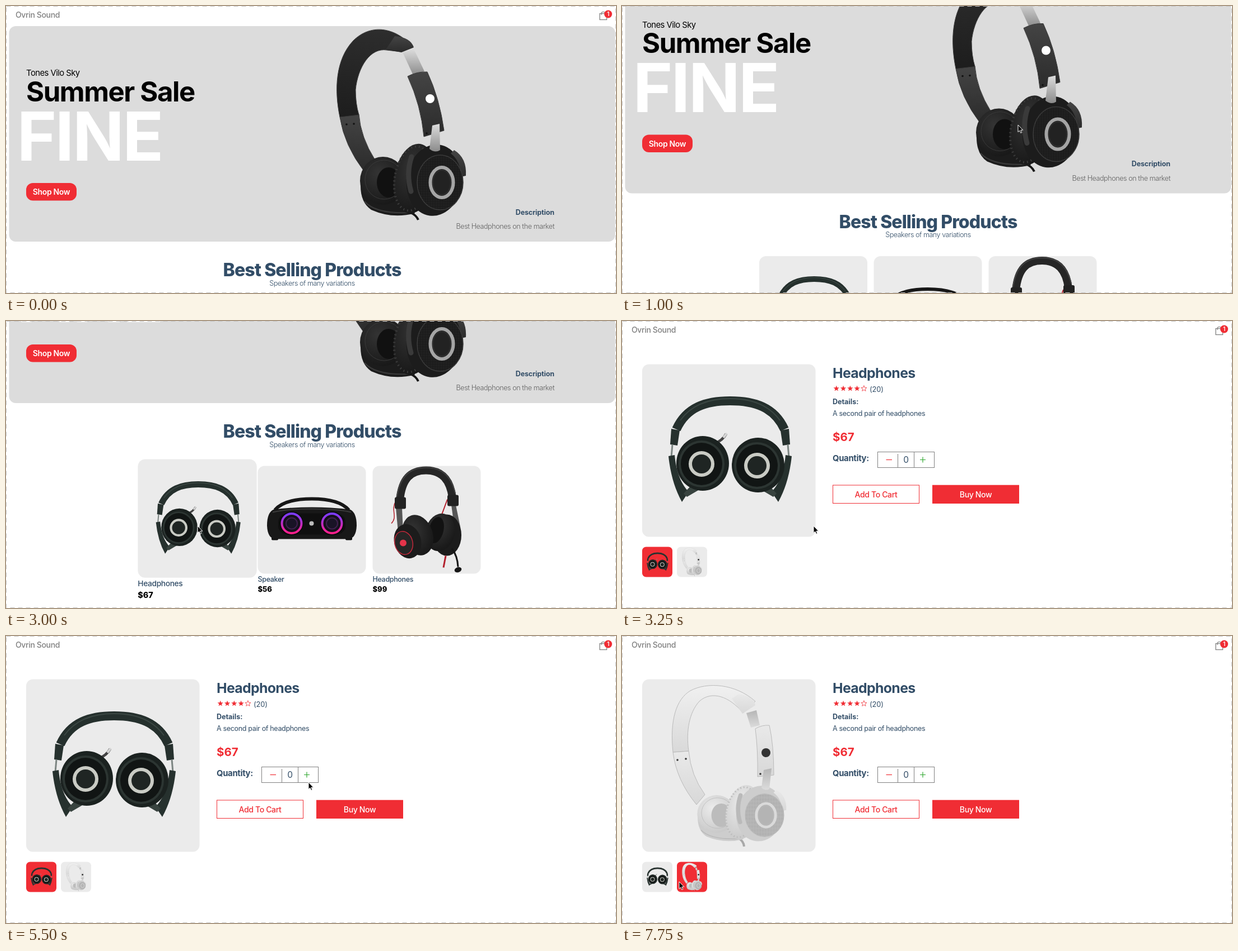
Write an HTML page that moves like this. It is 1089x514 px and loops after 8 s.

```html
<!DOCTYPE html>
<html lang="en">
<head>
<meta charset="utf-8">
<title>Sound shop</title>
<style>
  html, body { margin: 0; width: 100%; height: 100%; overflow: hidden; background: #fff; }
  svg { display: block; width: 1089px; height: 514px; font-family: Inter, Roboto, sans-serif; }
</style>
</head>
<body>
<svg id="stage" viewBox="0 0 1089 514"></svg>
<script>
const LOOP = 8000, STEP = 250;
const RED = '#f02d34', NAVY = '#324d67', GRAY = '#808080', CARD = '#ebebeb';

const text = (x, y, str, size, weight, fill, anchor = 'start', spacing = -0.026) =>
  `<text x="${x}" y="${y}" font-size="${size}" font-weight="${weight}" fill="${fill}" text-anchor="${anchor}" letter-spacing="${(spacing * size).toFixed(2)}">${str}</text>`;
const rect = (x, y, w, h, fill, r = 0, more = '') =>
  `<rect x="${x}" y="${y}" width="${w}" height="${h}" rx="${r}" fill="${fill}" ${more}/>`;
const oval = (x, y, rx, ry, fill, more = '', turn = 0) =>
  `<ellipse cx="${x}" cy="${y}" rx="${rx}" ry="${ry}" fill="${fill}" transform="rotate(${turn} ${x} ${y})" ${more}/>`;
const shape = (d, fill, more = '') => `<path d="${d}" fill="${fill}" ${more}/>`;
const line = (d, color, width, more = '') =>
  `<path d="${d}" fill="none" stroke="${color}" stroke-width="${width}" ${more}/>`;
const stroke = (color, width) => `stroke="${color}" stroke-width="${width}"`;
const group = (id, body, more = '') => `<g id="${id}" ${more}>${body}</g>`;
const use = (id, transform) => `<use href="#${id}" transform="${transform}"/>`;
const gradient = (id, top, bottom) =>
  `<linearGradient id="${id}" x2="0" y2="1"><stop stop-color="${top}"/><stop offset="1" stop-color="${bottom}"/></linearGradient>`;
const glow = (id, center, rim) =>
  `<radialGradient id="${id}" cx=".4" cy=".35" r=".65"><stop stop-color="${center}"/><stop offset="1" stop-color="${rim}"/></radialGradient>`;
const mesh = (id, base, dot) =>
  `<pattern id="${id}" width="3" height="3" patternUnits="userSpaceOnUse">${rect(0, 0, 3, 3, base)}${rect(0, 0, 1.4, 1.4, dot)}</pattern>`;

// Ear cups shared by the black and the white over-ear model
const cups = c => `
  ${shape('M633 322Q633 352 652 365Q690 382 730 371L700 290Z', c.body)}
  ${line('M640 350Q660 373 722 370', c.edge, 2)}
  ${oval(673, 313, 41, 43, c.pad)}${oval(675, 311, 34, 35, 'none', stroke(c.edge, 1))}
  ${oval(683, 316, 21, 27, c.hole)}
  ${oval(729, 309, 36, 63, c.pad, '', 10)}
  ${oval(726, 309, 32, 58, 'none', stroke(c.edge, 4) + ' stroke-dasharray="2 5"', 10)}
  ${oval(765, 312, 50, 64, c.body, '', 8)}
  ${line('M724 270Q714 300 723 332', c.edge, 9, 'stroke-linecap="round"')}
  ${shape('M800 258Q823 272 821 304L812 306Q812 278 794 264Z', c.arm)}
  ${oval(775, 316, 41, 49, c.mesh, stroke(c.edge, 1.5))}
  ${oval(778, 316, 20.5, 27, c.center, stroke(c.ring, 6))}
  ${oval(778, 316, 16, 22, 'none', stroke(c.edge, 1))}`;

const overEar = (id, c, p) => group(id, `
  ${line(p.cable, c.cable, 4)}
  ${shape(p.leftArm, c.arm, stroke(c.edge, 1))}
  ${shape(p.band, c.band, stroke(c.edge, 1))}${shape(p.cap, c.arm)}
  ${shape(p.slider, c.metal)}
  ${shape(p.arm, c.arm, stroke(c.edge, 1))}
  <circle cx="${p.logo[0]}" cy="${p.logo[1]}" r="8" fill="${c.logo}"/>
  ${p.screws.map(([x, y]) => oval(x, y, 1.8, 1.8, c.screw)).join('')}
  <g transform="${p.cups}">${cups(c)}</g>
  ${shape(p.joint, c.metal)}`);

const black = { body: '#1c1c1c', pad: 'url(#blackPad)', edge: '#3a3a3a', hole: '#111', arm: 'url(#blackArm)', band: 'url(#blackBand)',
  mesh: 'url(#darkMesh)', center: '#222', ring: '#a5a5a5', metal: 'url(#steel)', logo: '#fff', screw: '#111', cable: '#161616' };
const white = { body: '#cdcdcd', pad: 'url(#whitePad)', edge: '#bababa', hole: '#bcbcbc', arm: 'url(#whiteArm)', band: 'url(#whiteBand)',
  mesh: 'url(#lightMesh)', center: '#b4b4b4', ring: '#dadada', metal: 'url(#paleSteel)', logo: '#333', screw: '#333', cable: '#a8a8a8' };

const foldSide = `
  ${shape('M88 193L103 196 99 223 86 221Z', '#26312e')}
  ${line('M90 221L88 244', '#7c8582', 3)}
  ${shape('M83 242L94 240Q98 284 119 306L107 324Q88 290 83 242Z', '#26312e')}
  ${shape('M110 309L122 296 138 302 116 315Z', '#38433f')}`;
const foldCup = (x, y) => `
  ${oval(x + 2, y - 1, 47, 49, '#1b2220')}${oval(x, y, 41, 42, '#2c3532')}
  ${oval(x, y, 37, 38, '#111514')}
  ${oval(x, y, 20, 20, '#1f2523', stroke('#c9cbc4', 6))}`;
const folding = group('folding', `
  ${line('M97 194C115 154 150 143 193 143C236 143 272 154 290 194', '#25302d', 16)}
  ${line('M104 178C124 150 155 139 193 139C232 139 262 150 282 178', '#3b4743', 2)}
  ${foldSide}<g transform="matrix(-1 0 0 1 386 0)">${foldSide}</g>
  ${line('M163 221Q180 214 186 202', '#444', 5)}${line('M181 209L187 201', '#d5d5d5', 4)}
  ${foldCup(142, 256)}${foldCup(241, 259)}`);

const speakerCone = x => `
  ${oval(x, 360, 21, 21, '#08080a')}
  ${oval(x, 360, 17.5, 17.5, '#15101c', stroke('url(#neon)', 4))}
  ${oval(x, 360, 10, 10, '#191326', stroke('#40204f', 2))}`;
const speaker = `
  ${line('M480 336Q497 316 546 316Q595 316 612 336', '#171717', 6)}
  ${rect(474, 384, 12, 6, '#111', 2)}${rect(606, 384, 12, 6, '#111', 2)}
  ${shape('M478 335Q466 340 466 364Q467 388 482 388H610Q625 388 626 364Q626 340 614 335Q580 331 546 331Q512 331 478 335Z', '#181818')}
  ${line('M476 340Q500 334 546 334Q592 334 616 340', '#3b3b3b', 2)}
  ${rect(486, 342, 120, 38, '#0f0f0f', 16)}
  ${speakerCone(510)}${speakerCone(582)}
  <circle cx="545.5" cy="360" r="4" fill="#bbb"/>`;

const headset = `
  ${line('M696 320C686 336 700 348 688 360', '#b3202c', 1.5)}
  ${line('M788 317L778 344', '#b3202c', 2)}
  ${line('M703 318C707 280 722 265 750 265C778 265 793 282 797 314', '#262626', 14)}
  ${line('M698 312C704 274 722 260 750 260C778 260 794 274 802 306', '#414141', 2)}
  ${shape('M696 332L707 332 709 376 700 376Z', '#565656')}
  ${shape('M795 327L803 327 811 366 800 364Z', '#565656')}
  ${rect(694, 313, 20, 21, '#222', 3)}${rect(788, 309, 20, 20, '#222', 3)}
  ${oval(787, 381, 26, 37, '#1c1c1c')}
  ${oval(775, 376, 26, 34, 'url(#blackPad)', '', 12)}
  ${oval(768, 372, 13, 24, '#121212', '', 14)}
  ${oval(735, 381, 27, 37, 'url(#blackPad)', '', -18)}
  ${oval(717, 392, 24, 31, '#1c1c1c', '', -14)}
  ${oval(710, 395, 16, 21, '#262626', stroke('#c2283a', 1.5), -14)}
  <circle cx="709" cy="395" r="6" fill="#e4344a"/>
  ${line('M796 405Q806 418 807 438', '#161616', 3)}${oval(807, 443, 6.5, 4.5, '#161616', '', -20)}
  ${line('M785 418L781 439', '#b3202c', 3)}`;

const defs = `<defs>
  ${gradient('blackBand', '#2d2d2d', '#1d1d1d')}${gradient('whiteBand', '#f0f0f0', '#d9d9d9')}
  ${gradient('blackArm', '#444', '#2b2b2b')}${gradient('whiteArm', '#e9e9e9', '#d8d8d8')}
  ${gradient('steel', '#dcdcdc', '#8b8b8b')}${gradient('paleSteel', '#b5b5b5', '#dcdcdc')}
  ${gradient('neon', '#7a3cff', '#ff1f8a')}
  ${glow('blackPad', '#343434', '#191919')}${glow('whitePad', '#ececec', '#cacaca')}
  ${mesh('darkMesh', '#181818', '#333')}${mesh('lightMesh', '#bcbcbc', '#979797')}
  ${overEar('blackPhones', black, {
    cable: 'M722 370Q732 374 736 383',
    leftArm: 'M596 199L630 194Q633 235 659 276L640 297Q604 250 596 199Z',
    band: 'M596 199C586 150 588 96 620 62C650 32 694 36 727 74L706 82 680 79C650 74 628 110 624 150Q624 175 630 195Z',
    cap: 'M678 78L694 54Q722 56 728 74L706 83Z',
    slider: 'M708 83L728 77 747 117 727 124Z',
    arm: 'M717 126Q734 117 752 118Q774 165 782 223L746 234Q741 178 717 126Z',
    joint: 'M761 214L774 211 775 258Q766 264 756 256Z',
    logo: [757, 166], screws: [[608, 212], [621, 211], [751, 228]], cups: '' })}
  ${overEar('whitePhones', white, {
    cable: 'M208 362Q217 367 218 377',
    leftArm: 'M91 208L119 206Q123 250 148 284L133 302Q97 258 91 208Z',
    band: 'M91 208C85 150 97 113 122 98C152 82 202 85 238 117L216 138C192 108 160 97 138 117C120 137 114 170 119 206Z',
    cap: 'M196 112L208 104Q236 108 238 124L215 139Z',
    slider: 'M222 138L240 133 246 160 230 164Z',
    arm: 'M238 166Q250 159 263 160Q271 195 271 249L242 252Q243 205 238 166Z',
    joint: 'M253 240L267 237 263 274Q256 278 249 272Z',
    logo: [257, 209], screws: [[99, 222], [114, 220], [247, 247]],
    cups: 'translate(257 321) scale(.84 .78) translate(-778 -316)' })}
  ${folding}
</defs>`;

const header = `
  ${text(17, 21, 'Ovrin Sound', 14, 500, GRAY)}
  ${rect(1060, 13.5, 12.5, 11, 'none', 0, stroke(GRAY, 1.3))}
  ${line('M1063 16V13Q1063 10.5 1066.2 10.5T1069.5 13V16', GRAY, 1.2)}
  <circle cx="1075" cy="14.5" r="7" fill="${RED}"/>${text(1075, 18, '1', 10, 600, '#fff', 'middle')}`;

const product = (id, x, name, price, art) => group(id, `
  ${rect(x, 534.5, 193, 193, CARD, 12)}${art}
  ${text(x, 741.5, name, 12.5, 500, NAVY)}${text(x, 760, price, 13, 800, '#000', 'start', 0)}`);

const home = group('home', `${header}
  ${rect(5.5, 36, 1082, 386, '#dcdcdc', 12)}
  ${text(19.5, 276.5, 'FINE', 121, 700, '#fff', 'start', -.024)}
  ${text(36, 125, 'Tones Vilo Sky', 14.8, 400, '#000', 'start', -.035)}
  ${text(36, 170.5, 'Summer Sale', 49, 700, '#000', 'start', -.028)}
  ${use('blackPhones', '')}
  ${rect(36, 317, 90, 31.5, RED, 12)}${text(81, 338, 'Shop Now', 14, 600, '#fff', 'middle')}
  ${text(979, 373.5, 'Description', 12.5, 700, NAVY, 'end', -.01)}
  ${text(979, 399, 'Best Headphones on the market', 12.5, 300, '#5f5f5f', 'end', -.031)}
  ${text(546.5, 484, 'Best Selling Products', 32, 800, NAVY, 'middle', -.028)}
  ${text(546.5, 500.5, 'Speakers of many variations', 12.5, 300, NAVY, 'middle', -.034)}
  ${product('speaker', 449.5, 'Speaker', '$56', `<g transform="translate(0 277.5)">${speaker}</g>`)}
  ${product('headset', 654.5, 'Headphones', '$99', `<g transform="translate(0 277.5)">${headset}</g>`)}
  ${product('hovered', 245, 'Headphones', '$67', use('folding', 'translate(245 534.5) scale(.6246) translate(-36 -77.5)'))}`);

const star = (x, y, filled) => {
  const points = Array.from({ length: 10 }, (_, i) => {
    const a = (i / 5 - .5) * Math.PI, r = i % 2 ? 2.3 : 5.4;
    return `${(x + r * Math.cos(a)).toFixed(2)},${(y + r * Math.sin(a)).toFixed(2)}`;
  });
  return `<polygon points="${points.join(' ')}" fill="${filled ? RED : 'none'}" ${stroke(RED, filled ? 0 : .8)}/>`;
};
const thumb = (id, x, art) =>
  `${rect(x, 404.5, 54, 54, CARD, 7, `id="${id}"`)}${use(art, `translate(${x} 404.5) scale(.1748) translate(-36 -77.5)`)}`;

const detail = group('detail', `${header}
  ${rect(36, 77.5, 309.5, 309, CARD, 12)}
  ${group('photoBlack', use('folding', ''))}${group('photoWhite', use('whitePhones', ''))}
  ${thumb('thumbBlack', 36, 'folding')}${thumb('thumbWhite', 98, 'whitePhones')}
  ${text(376, 101.5, 'Headphones', 24.8, 700, NAVY)}
  ${[0, 1, 2, 3, 4].map(i => star(382.7 + i * 12.3, 121, i < 4)).join('')}
  ${text(442, 127, '(20)', 12.8, 400, NAVY, 'start', -.01)}
  ${text(376, 148.5, 'Details:', 12.5, 700, NAVY, 'start', 0)}
  ${text(376, 170, 'A second pair of headphones', 12.5, 400, NAVY)}
  ${text(376, 215, '$67', 20.5, 700, RED, 'start', 0)}
  ${text(376, 250.5, 'Quantity:', 14.8, 700, NAVY, 'start', -.02)}
  ${rect(456.5, 234.5, 101, 28, 'none', 0, stroke(GRAY, 1))}
  ${line('M492.5 238V262M521.5 235V262', GRAY, 1)}
  ${line('M471.5 248.5H482', RED, 1.2)}${line('M532 248.5H542M537 243.5V253.5', '#31a831', 1.2)}
  ${text(507, 254, '0', 15.5, 400, NAVY, 'middle')}
  ${group('addButton', rect(376.5, 294, 154, 32.5, '#fff', 0, stroke(RED, 1)) + text(453.5, 315.5, 'Add To Cart', 14, 500, RED, 'middle'))}
  ${rect(554, 293.7, 155, 33.3, RED)}${text(631.5, 315.5, 'Buy Now', 14, 500, '#fff', 'middle')}`);

const stage = document.getElementById('stage');
stage.innerHTML = defs + home + detail +
  rect(.5, .5, 1088, 513, 'none', 0, stroke('#c4c4c4', 1) + ' stroke-dasharray="8 6"') +
  shape('M0 0V12.6L2.8 10 4.8 14.4 6.8 13.5 4.9 9.2H8.8Z', '#000', 'id="cursor" stroke="#fff" stroke-width="1"');
const part = id => document.getElementById(id);

// Each track holds a value from its time until the next entry
const at = (track, t) => track.filter(([start]) => start <= t).pop().slice(1);
const homeScroll = [[0, 0], [250, 4], [500, 18], [750, 42], [1000, 86.5], [1250, 253], [1500, 277.5], [1750, 276.5], [2000, 275.5], [2250, 275]];
const detailScroll = [[0, 0], [4500, 2.5], [4750, 1.5], [5000, .7], [5250, .2], [5500, 0]];
const cardScale = [[0, 1], [2750, 1.07], [3000, 1.1]];
const buttonScale = [[0, 1], [6250, 1.05], [6500, 1.1], [6750, 1.01], [7000, 1]];
const cursorPath = [[0, -50, -50], [250, 707, 213], [2250, 600, 265], [2750, 342, 367], [3750, 465, 385],
  [5000, 540, 262], [5750, 530, 256], [6250, 470, 308], [6500, 380, 322], [6750, 154, 406],
  [7000, 135, 430], [7250, 148, 500], [7500, 112, 460], [7750, 102, 440]];

const move = (id, value) => part(id).setAttribute('transform', value);
const show = (id, visible) => part(id).setAttribute('display', visible ? 'inline' : 'none');
const scaleAround = (x, y, k) => `translate(${x} ${y}) scale(${k}) translate(${-x} ${-y})`;

function draw(now) {
  const t = Math.floor(now % LOOP / STEP) * STEP;
  const onDetail = t >= 3250, whiteChosen = t >= 7000;
  show('home', !onDetail);
  show('detail', onDetail);
  move('home', `translate(0 ${-at(homeScroll, t)[0]})`);
  move('detail', `translate(0 ${-at(detailScroll, t)[0]})`);
  move('hovered', scaleAround(341.5, 654.5, at(cardScale, t)[0]));
  move('addButton', scaleAround(453.5, 310.3, at(buttonScale, t)[0]));
  move('cursor', `translate(${at(cursorPath, t).join(' ')})`);
  show('photoBlack', !whiteChosen);
  show('photoWhite', whiteChosen);
  part('thumbBlack').setAttribute('fill', whiteChosen ? CARD : RED);
  part('thumbWhite').setAttribute('fill', whiteChosen ? RED : CARD);
}

function tick() {
  draw(performance.now());
  requestAnimationFrame(tick);
}
tick();
</script>
</body>
</html>
```
